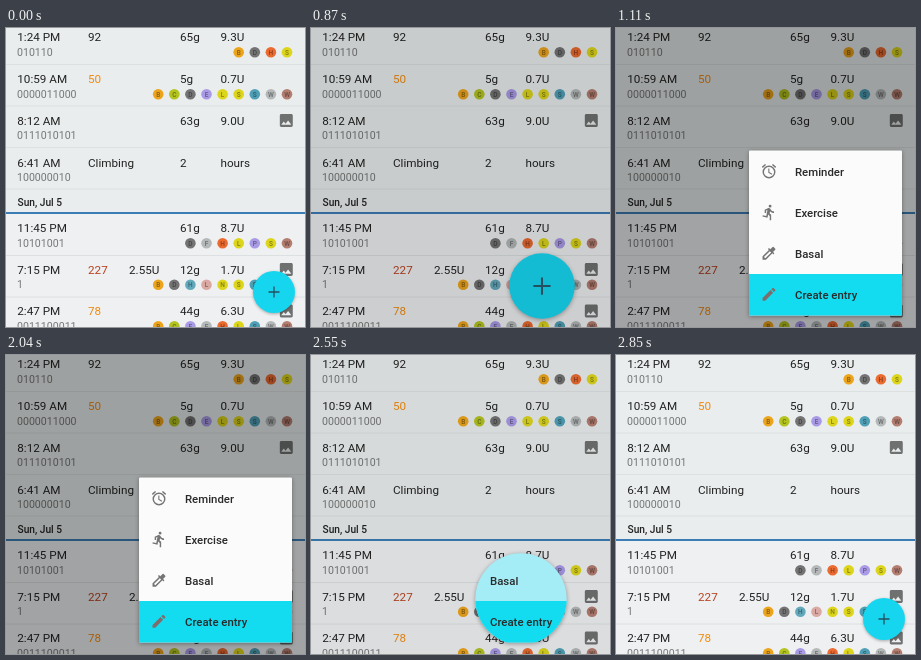
These frames come from a looping animation (299x299 px, 3.03 s). An HTML page:

```html
<!DOCTYPE html>
<html lang="en">
<head>
<meta charset="utf-8">
<title>Log with action sheet</title>
<style>
  html, body { margin: 0; width: 100%; height: 100%; overflow: hidden; background: #e9eded; }
  svg { display: block; width: 100vw; height: 100vh; font-family: Roboto, sans-serif; }
  .main { font-size: 11.7px; fill: #222; }
  .tags { font-size: 10.6px; fill: #767878; }
  .day { font-size: 10.2px; font-weight: 500; fill: #222; }
  .dot { font-size: 6.5px; font-weight: 500; text-anchor: middle; fill: #000; fill-opacity: .42; }
  .item { font-size: 11.4px; font-weight: 500; fill: #2a2a2a; }
  .sheet { filter: drop-shadow(0 1px 2px rgba(0, 0, 0, .35)); }
  .fab { filter: drop-shadow(0 1.5px 1.5px rgba(0, 0, 0, .3)); }
</style>
</head>
<body>
<svg id="stage" viewBox="0 0 299 299">
  <defs><clipPath id="hole"><circle id="reveal"/></clipPath></defs>
  <rect width="299" height="299" fill="#e9eded"/>
  <rect y="185" width="299" height="114" fill="#eff0f2"/>
  <g id="list"></g>
  <rect id="scrim" width="299" height="299"/>
  <g id="sheet" class="sheet"><g clip-path="url(#hole)">
    <rect id="paper" x="133" y="122.5" width="153" height="165" rx="1"/>
    <rect x="133" y="246" width="153" height="41.5" fill="#14dcf0"/>
    <g id="menu"></g>
  </g></g>
  <g id="fab" class="fab">
    <circle id="disc" r="21"/>
    <path d="M-5.5 0H5.5M0-5.5V5.5" stroke="#25505f" stroke-width="1.3"/>
  </g>
</svg>
<script>
const $ = id => document.getElementById(id);
const LOOP = 3030, STEP = 30;
const CYAN = [22, 214, 239], PRESSED = [5, 165, 198], GROWN = [20, 188, 211], WHITE = [251, 251, 251];

const TONES = {
  B: '#eca41c', C: '#b3c320', D: '#737373', E: '#a99ae6', F: '#b4b8b8', H: '#ea6a30',
  L: '#dcd51c', P: '#a99ae6', S: '#dcd51c', T: '#4fa0b6', W: '#b4b8b8', X: '#b37d70',
  I: '#62a9bb', M: '#dba9a4', N: '#dcd51c'
};
// Some letters come in a second tone
const LETTERS = { T: 'S', X: 'W', I: 'H', M: 'L' };

const ICONS = {
  image: 'M21 19V5c0-1.1-.9-2-2-2H5c-1.1 0-2 .9-2 2v14c0 1.1.9 2 2 2h14c1.1 0 2-.9 2-2zM8.5 13.5l2.5 3L14.5 12l4.5 6H5z',
  run: 'M11.5 3.5a2 2 0 1 0 4 0a2 2 0 1 0-4 0zM9.9 19.4l1-4.4 2.1 2v6h2v-7.5l-2.1-2 .6-3c1.3 1.5 3.3 2.5 5.5 2.5v-2c-1.9 0-3.5-1-4.3-2.4l-1-1.6c-.4-.6-1-1-1.7-1l-.8.1L6 8.3V13h2V9.6l1.8-.7L8.2 17l-4.9-1-.4 2z',
  dropper: 'M20.7 5.6l-2.3-2.3q-.7-.6-1.4 0l-3.2 3.1-1.9-1.9-1.4 1.4 1.4 1.4L3 16.2V21h4.8l8.9-8.9 1.4 1.4 1.4-1.4-1.9-1.9 3.1-3.2q.6-.7 0-1.4zM6.9 19L5 17.1 13.1 9l1.9 1.9z',
  pencil: 'M3 17.2V21h3.8L17.8 9.9l-3.7-3.7zM20.7 7q.6-.7 0-1.4l-2.3-2.3q-.7-.6-1.4 0l-1.9 1.8 3.8 3.8z'
};

const text = (cls, x, y, s) => `<text class="${cls}" x="${x}" y="${y}">${s}</text>`;
const icon = (x, y, body) => `<g transform="translate(${x} ${y}) scale(.72) translate(-12 -12)">${body}</g>`;
const glyph = (name, fill) => `<path d="${ICONS[name]}" fill="${fill}"/>`;
const hline = (y, color, w) => `<path d="M0 ${y}H299" stroke="${color}" stroke-width="${w}"/>`;
const alarm = '<g fill="none" stroke="#757575" stroke-width="2"><circle cx="12" cy="13" r="8"/>' +
  '<path d="M2.7 6.5L7.2 2.6M21.3 6.5L16.8 2.6"/><path d="M11.8 8v5.6l4.3 2.6" stroke-width="1.5"/></g>';

function dots(tags, y) {
  return [...tags].map((k, i) => {
    const x = 281 - (tags.length - 1 - i) * 16.1;
    return `<circle cx="${x}" cy="${y}" r="5.3" fill="${TONES[k]}"/>` +
      text('dot', x, y + 2.3, LETTERS[k] || k);
  }).join('');
}

const rows = [
  { y: 9, time: '1:24 PM', code: '010110', level: '92', carbs: '65g', dose: '9.3U', tags: 'BDHS' },
  { y: 51, time: '10:59 AM', code: '0000011000', level: '50', tone: '#f08a10', carbs: '5g', dose: '0.7U', tags: 'BCDELSTWX' },
  { y: 92.5, time: '8:12 AM', code: '0111010101', carbs: '63g', dose: '9.0U', photo: true },
  { y: 134.5, time: '6:41 AM', code: '100000010', level: 'Climbing', carbs: '2', dose: 'hours' },
  { y: 200, time: '11:45 PM', code: '10101001', carbs: '61g', dose: '8.7U', tags: 'DFHLPSX' },
  { y: 241.5, time: '7:15 PM', code: '1', level: '227', tone: '#b8421f', basal: '2.55U', carbs: '12g', dose: '1.7U', tags: 'BDIMNSTWX', photo: true },
  { y: 283, time: '2:47 PM', code: '0011100011', level: '78', tone: '#f08a10', carbs: '44g', dose: '6.3U', tags: 'BCEFHLTWX', photo: true }
];

function row(r) {
  const base = r.y + 4.2;
  const cell = (x, s) => s ? text('main', x, base, s) : '';
  const level = cell(82, r.level);
  return cell(11.3, r.time) + text('tags', 11, r.y + 18.8, r.code) +
    (r.tone ? `<g style="--c:${r.tone}">${level.replace('<text', '<text style="fill:var(--c)"')}</g>` : level) +
    cell(123, r.basal) + cell(174, r.carbs) + cell(214.5, r.dose) +
    dots(r.tags || '', r.y + 15.2) +
    (r.photo ? icon(280.3, r.y, glyph('image', '#6f7171')) : '');
}

$('list').innerHTML =
  [36.5, 78, 119.5, 161, 227.5, 269].map(y => hline(y, '#dde0e0', 1)).join('') +
  rows.map(row).join('') + text('day', 11.5, 178.4, 'Sun, Jul 5') + hline(185, '#3d7db5', 1.8);

$('menu').innerHTML = [
  ['Reminder', alarm],
  ['Exercise', glyph('run', '#757575')],
  ['Basal', glyph('dropper', '#757575')],
  ['Create entry', glyph('pencil', '#7b6e6c')]
].map(([label, body], i) => {
  const y = 143.3 + 41 * i;
  return icon(153, y, body) + text('item', 179, y + 4.2, label);
}).join('');

const ramp = (t, a, b) => Math.min(1, Math.max(0, (t - a) / (b - a)));
const ease = (t, a, b) => (1 - Math.cos(Math.PI * ramp(t, a, b))) / 2;
const mix = (a, b, k) => `rgb(${a.map((v, i) => Math.round(v + (b[i] - v) * k))})`;

function draw(t) {
  const closing = t >= 2370;
  // move: button travels to the sheet; open: sheet is uncovered
  const move = closing ? 1 - ease(t, 2595, 2850) : ramp(t, 720, 955);
  const open = closing ? 1 - ease(t, 2370, 2595) : ease(t, 885, 1110);
  const x = 268 - 58 * move;
  const y = 264 - 20 * move ** 2.7;
  const r = 21 + 14 * Math.sin(move * Math.PI / 2);
  const shown = open > 0;

  $('scrim').setAttribute('opacity', .32 * (closing ? 1 - ease(t, 2370, 2640) : ease(t, 690, 1080)));

  $('sheet').style.display = shown ? '' : 'none';
  $('reveal').setAttribute('cx', x);
  $('reveal').setAttribute('cy', y);
  $('reveal').setAttribute('r', r + 112 * open);
  $('paper').setAttribute('fill', closing
    ? mix(WHITE, CYAN, ramp(t, 2370, 2600) ** 4)
    : mix(GROWN, WHITE, ease(t, 870, 1110)));

  $('fab').style.display = shown ? 'none' : '';
  $('fab').setAttribute('transform', `translate(${x} ${y}) scale(${r / 21})`);
  $('disc').setAttribute('fill', closing || t < 690 ? mix(CYAN, CYAN, 0) : mix(PRESSED, GROWN, ramp(t, 720, 870)));
}

function tick(now) {
  draw(Math.floor(now % LOOP / STEP) * STEP);
  requestAnimationFrame(tick);
}
draw(0);
requestAnimationFrame(tick);
</script>
</body>
</html>
```
